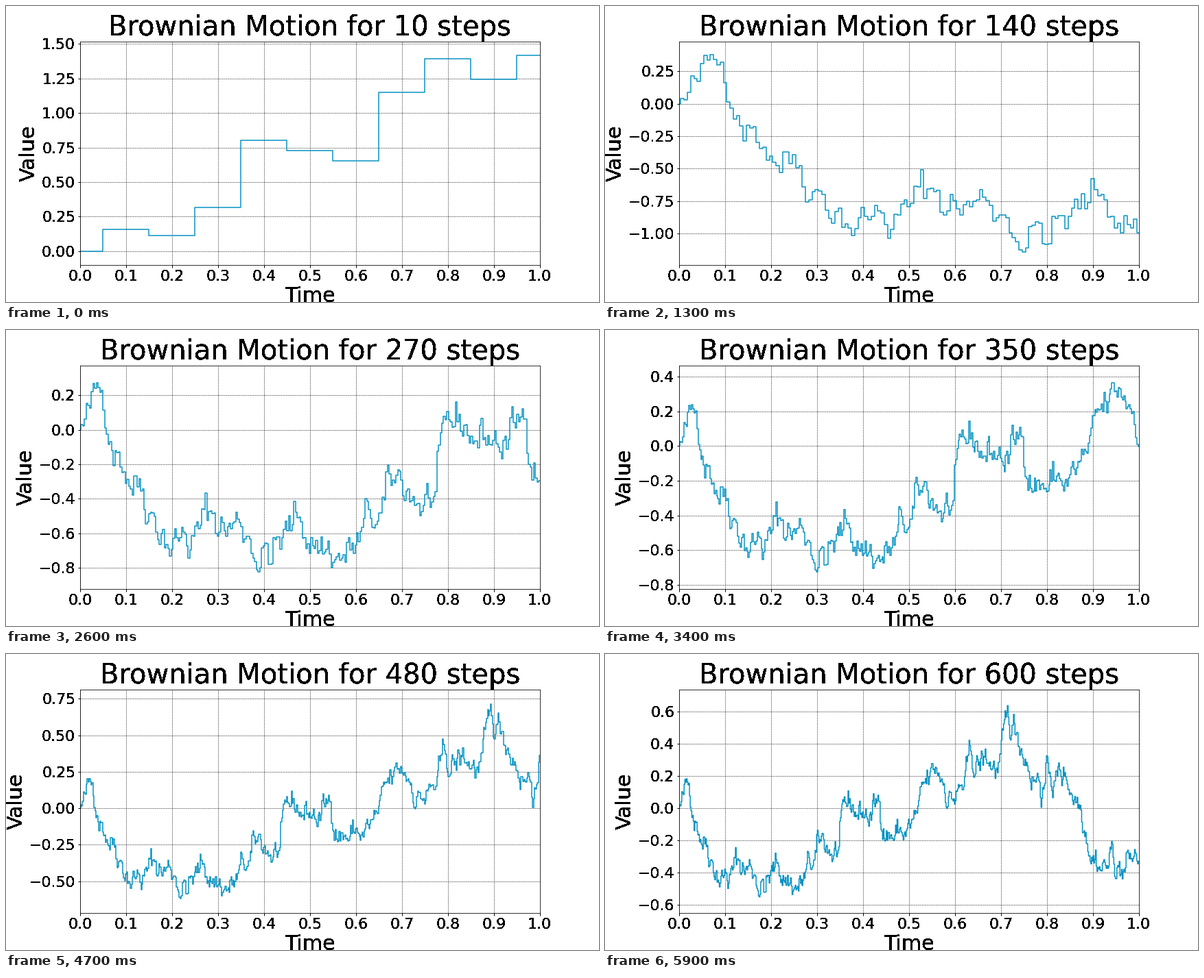
These frames come from a looping animation (864x432 px, 6000 ms). A matplotlib script:

```python
import matplotlib.pyplot as plt
import numpy as np
from matplotlib.animation import FuncAnimation

FRAMES = 60
STEPS_PER_FRAME = 10
MARGIN = 0.1

rng = np.random.RandomState(42)
noise = rng.standard_normal(FRAMES * STEPS_PER_FRAME)


def brownian(n):
    """Times and values of an n-step path on [0, 1]."""
    values = np.concatenate([[0], np.cumsum(noise[:n]) / np.sqrt(n)])
    return np.linspace(0, 1, n + 1), values


def hard_edges(image, dpi):
    """Turn soft glyph edges into solid black pixels."""
    solid = np.zeros_like(image)
    solid[..., 3] = image[..., 3] > 0.2
    return solid, 0, 0


def sharpen(*texts):
    for text in texts:
        text.set_agg_filter(hard_edges)


fig, ax = plt.subplots(figsize=(12, 6), dpi=72, facecolor="white")
fig.subplots_adjust(left=0.125, right=0.9, bottom=0.125, top=0.88)

line, = ax.plot([], [], color="#0492C2", lw=1.5, drawstyle="steps-mid")
ax.set_xlim(0, 1)
ax.set_xticks(np.linspace(0, 1, 11))
ax.tick_params(labelsize=22, width=1)
ax.grid(color="black", linestyle="--", linewidth=0.5)
title = ax.set_title("", fontsize=40)
x_label = ax.set_xlabel("Time", fontsize=30)
y_label = ax.set_ylabel("Value", fontsize=30)
sharpen(title, x_label, y_label)


def update(i):
    n = STEPS_PER_FRAME * (i + 1)
    times, values = brownian(n)
    line.set_data(times, values)
    ax.set_ylim(values.min() - MARGIN, values.max() + MARGIN)
    title.set_text(f"Brownian Motion for {n} steps")
    sharpen(*ax.get_xticklabels(), *ax.get_yticklabels())
    return line, title


anim = FuncAnimation(fig, update, frames=FRAMES, interval=100,
                     repeat=True, repeat_delay=0, blit=False)
plt.show()
```
